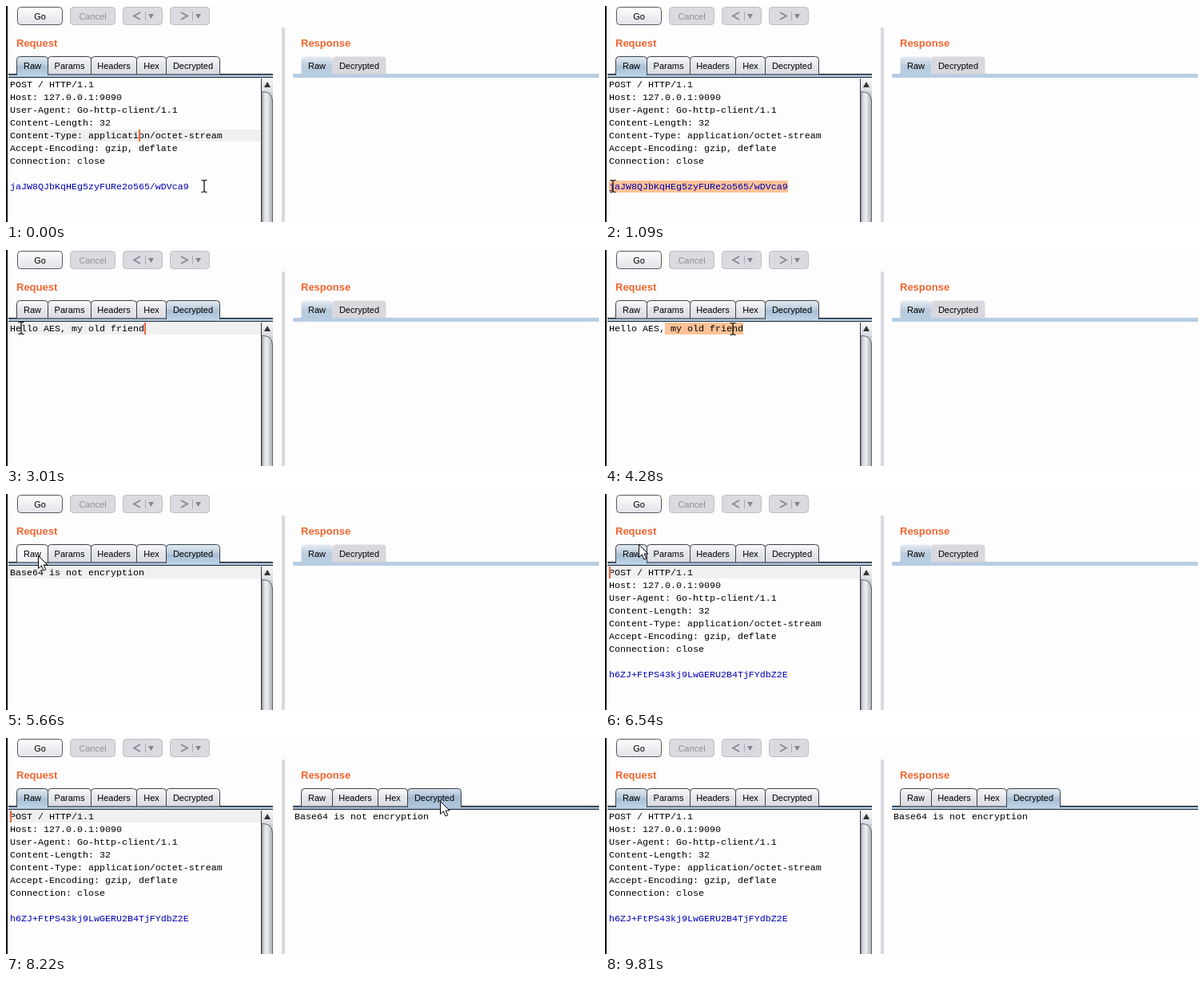
An HTML page for the animation above (9860 ms loop, 742x271 px).

```html
<!DOCTYPE html>
<html lang="en">
<head>
<meta charset="utf-8">
<title>Encrypted request editor</title>
<style>
  html, body { margin: 0; width: 100%; height: 100%; overflow: hidden; background: #fdfdfd; }
  svg { display: block; }
  text { font: 11px "Liberation Sans", Arial, sans-serif; white-space: pre; }
  .mid { text-anchor: middle; }
  .title { font-size: 13px; font-weight: bold; fill: #f0652f; }
  .code { font: 11.667px "Liberation Mono", "Courier New", monospace; }
</style>
</head>
<body>
<svg width="742" height="271" viewBox="0 0 742 271">
  <defs>
    <linearGradient id="plain" x2="0" y2="1"><stop stop-color="#fafafb"/><stop offset=".5" stop-color="#e4e6ea"/><stop offset="1" stop-color="#d9dce2"/></linearGradient>
    <linearGradient id="button" x2="0" y2="1"><stop stop-color="#fff"/><stop offset=".5" stop-color="#eeeff2"/><stop offset="1" stop-color="#e2e4e9"/></linearGradient>
    <linearGradient id="hover" x2="0" y2="1"><stop stop-color="#fff"/><stop offset="1" stop-color="#eff1f5"/></linearGradient>
    <linearGradient id="chosen" x2="0" y2="1"><stop stop-color="#e3ebf2"/><stop offset=".45" stop-color="#bccddd"/><stop offset=".55" stop-color="#a9bfd3"/><stop offset="1" stop-color="#bcd2e6"/></linearGradient>
    <linearGradient id="pressed" x2="0" y2="1"><stop stop-color="#d9e3ec"/><stop offset=".5" stop-color="#a4bad0"/><stop offset="1" stop-color="#b0c8de"/></linearGradient>
    <linearGradient id="idle" x2="0" y2="1"><stop stop-color="#e6ecf2"/><stop offset=".5" stop-color="#b9cbdc"/><stop offset="1" stop-color="#b8cde2"/></linearGradient>
    <linearGradient id="thumb"><stop stop-color="#8b8e95"/><stop offset=".2" stop-color="#d5d7dc"/><stop offset=".5" stop-color="#eceef1"/><stop offset="1" stop-color="#a6a9b1"/></linearGradient>
  </defs>
  <rect width="742" height="271" fill="#fdfdfd"/>
  <rect width="2" height="271"/>
  <rect x="345" y="27" width="4" height="244" fill="#d8d8df"/>
  <text class="title" x="13" y="51">Request</text>
  <text class="title" x="369" y="51">Response</text>
  <g id="buttons"></g>
  <g id="request"></g>
  <g id="response"></g>
  <g id="scrollbar">
    <rect x="319" y="91" width="15" height="180" fill="#c9ccd3"/>
    <rect x="320" y="91" width="14" height="17" fill="url(#plain)"/>
    <path d="M323 102L327 95L331 102Z" fill="#333"/>
    <path d="M320 271V108Q332 107 333.5 118V271Z" fill="url(#thumb)"/>
    <path d="M320 107.5Q332 107 333.5 118V271" fill="none" stroke="#63666d"/>
    <path d="M319.5 91V271" stroke="#33363b"/>
  </g>
  <g id="pointer">
    <path id="arrow" d="M.5 .5V16.5L4.3 13L7 19L9.8 17.8L7.2 12H12Z" fill="#fff" stroke="#000"/>
    <path id="beam" d="M-3.5 -7.5H-1.5L0 -6.5L1.5 -7.5H3.5M0 -6.5V6.5M-3.5 7.5H-1.5L0 6.5L1.5 7.5H3.5" fill="none" stroke="#000" stroke-width="1.2"/>
  </g>
</svg>
<script>
const LOOP = 9860, CHAR = 7, LINE = 16, LEFT = 5, RIGHT = 361;
const $ = id => document.getElementById(id);

const OLD_BODY = 'jaJW8QJbKqHEg5zyFURe2o565/wDVca9';
const NEW_BODY = 'h6ZJ+FtPS43kj9LwGERU2B4TjFYdbZ2E';
const GREETING = 'Hello AES, my old friend';
const TYPED = 'Base64 is not encryption';
const REQUEST = ['POST / HTTP/1.1', 'Host: 127.0.0.1:9090', 'User-Agent: Go-http-client/1.1',
  'Content-Length: 32', 'Content-Type: application/octet-stream',
  'Accept-Encoding: gzip, deflate', 'Connection: close', ''];
const RESPONSE = ['HTTP/1.1 200 OK', 'Date: Mon, 10 Sep 2018 12:04:31 GMT', 'Content-Length: 32',
  'Content-Type: text/plain; charset=utf-8', 'Connection: close', '', NEW_BODY];

const WIDTHS = { Raw: 39, Params: 54, Headers: 57, Hex: 37, Decrypted: 67 };
const REQUEST_TABS = ['Raw', 'Params', 'Headers', 'Hex', 'Decrypted'];
const RESPONSE_TABS = ['Raw', 'Headers', 'Hex', 'Decrypted'];

// time, x, y; the pointer is a text beam below the tab bars
const PATH = [
  [0, 248, 226], [320, 248, 226], [480, 261, 226], [620, 232, 226], [1080, 10, 226],
  [1320, 10, 226], [1690, 205, 82], [1780, 228, 55], [1890, 225, 69], [2350, 225, 69],
  [2540, 60, 104], [2700, 19, 98], [3450, 19, 98], [3570, 203, 95], [3680, 168, 95],
  [3860, 168, 95], [4100, 160, 99], [4640, 160, 99], [5100, 150, 103], [5590, 140, 96],
  [5650, 40, 77], [6420, 40, 77], [6800, 48, 17], [7430, 48, 17], [7980, 543, 79],
  [8610, 543, 79], [8790, 560, 121], [9220, 560, 121], [9800, 692, 292]
];
// time, first selected column of the greeting
const WORD_STEPS = [[3860, 24], [3910, 18], [4030, 14], [4150, 11], [4250, 10], [4340, 6], [4390, 0]];

function pointerAt(t) {
  const i = PATH.findIndex(p => p[0] > t);
  if (i < 0) return PATH[PATH.length - 1].slice(1);
  const [t0, x0, y0] = PATH[i - 1], [t1, x1, y1] = PATH[i];
  const u = (t - t0) / (t1 - t0), k = u * u * (3 - 2 * u);
  return [x0 + (x1 - x0) * k, y0 + (y1 - y0) * k];
}

const rect = (x, y, w, h, fill, extra = '') =>
  `<rect x="${x}" y="${y}" width="${w}" height="${h}" fill="${fill}" ${extra}/>`;
const lineTop = row => 91 + LINE * row;
const code = (x, row, str, fill = '#000') =>
  `<text class="code" x="${x}" y="${lineTop(row) + 11}" fill="${fill}">${str}</text>`;
const band = row => rect(3, lineTop(row), 316, 15, '#f0f0f0');
const caret = (col, row) => rect(LEFT + CHAR * col, lineTop(row), 2, 15, '#f0653a');
const selection = (from, to, row) =>
  rect(LEFT + CHAR * from, lineTop(row), CHAR * (to - from), 15, '#ffc296');

function button(x, w, on, label) {
  const face = rect(x + .5, 1.5, w, 22, on ? 'url(#button)' : '#d9dbe0',
    `rx="4" stroke="${on ? '#55585f' : '#bcbec5'}"`);
  return face + (label ? `<text class="mid" x="${x + w / 2 + .5}" y="17" fill="${on ? '#000' : '#8e9096'}">${label}</text>` : '');
}

function arrowButton(x, chevron) {
  return button(x, 49, false) +
    `<path d="${chevron}" fill="none" stroke="#85878d" stroke-width="1.7"/>` +
    `<path d="M${x + 28.5} 7V18" stroke="#a9abb1"/>` +
    `<path d="M${x + 32} 10H${x + 39}L${x + 35.5} 16Z" fill="#85878d"/>`;
}

function tabs(x, end, names, chosen, { idle, pressed, hover } = {}) {
  const start = x - 10;
  let out = idle
    ? rect(start, 85, end - start, 5, '#b8cde2')
    : rect(start, 85, end - start, 5, '#16202b') +
      rect(start, 86.5, end - start, 2.5, pressed ? '#a3bdd5' : '#b8d0e6');
  for (const name of names) {
    const w = WIDTHS[name], on = name === chosen;
    const fill = idle ? (on ? 'url(#idle)' : '#d8d8de')
      : on ? `url(#${pressed ? 'pressed' : 'chosen'})`
      : `url(#${name === hover ? 'hover' : 'plain'})`;
    const base = on ? 87 : 85.5;
    out += `<path d="M${x + .5} ${base}V67.5Q${x + .5} 63.5 ${x + 4.5} 63.5H${x + w - 3.5}` +
      `Q${x + w + .5} 63.5 ${x + w + .5} 67.5V${base}" fill="${fill}" stroke="${idle ? 'none' : '#3b4048'}"/>` +
      `<text class="mid" x="${x + w / 2 + .5}" y="79">${name}</text>`;
    x += w;
  }
  return out;
}

function rawRequest(body, under, over = '') {
  return under + REQUEST.map((s, i) => code(LEFT, i, s)).join('') + code(LEFT, 8, body, '#0000b4') + over;
}

function requestText(t, x) {
  if (t < 1890) {
    if (t < 620) return rawRequest(OLD_BODY, band(4), caret(23, 4));
    const from = t > 1080 ? 0 : Math.max(0, Math.min(32, Math.round((x - LEFT) / CHAR)));
    return rawRequest(OLD_BODY, selection(from, 32, 8));
  }
  if (t < 2650) return code(LEFT, 0, GREETING);
  if (t < 3860) return band(0) + code(LEFT, 0, GREETING) + caret(t < 3010 ? 1 : 24, 0);
  if (t < 4640) {
    const from = WORD_STEPS.filter(s => s[0] <= t).pop()[1];
    return selection(from, 24, 0) + code(LEFT, 0, GREETING);
  }
  if (t < 5780) {
    const n = Math.min(24, 1 + Math.floor((t - 4640) / 950 * 23));
    return band(0) + code(LEFT, 0, TYPED.slice(0, n)) + (t < 5620 ? caret(n, 0) : '');
  }
  const focus = t < 8660;
  const lit = t < 6160 || Math.floor((t - 6160) / 500) % 2 === 0;
  return rawRequest(NEW_BODY, focus ? band(0) : '', focus && lit ? caret(0, 0) : '');
}

function requestPane(t, x) {
  const decrypted = t >= 1890 && t < 5780;
  return tabs(13, 334, REQUEST_TABS, decrypted ? 'Decrypted' : 'Raw', {
    pressed: t >= 1890 && t < 2170 || t >= 5780 && t < 6060,
    hover: t >= 5640 && t < 5780 ? 'Raw' : ''
  }) + requestText(t, x);
}

function responsePane(t) {
  if (t < 7330) return tabs(369, 742, ['Raw', 'Decrypted'], 'Raw', { idle: true });
  if (t < 8170) return tabs(369, 742, RESPONSE_TABS, 'Raw') + RESPONSE.map((s, i) => code(RIGHT, i, s)).join('');
  return tabs(369, 742, RESPONSE_TABS, 'Decrypted', { pressed: t < 8360 }) + code(RIGHT, 0, TYPED);
}

function toolbar(t) {
  const busy = t >= 7100 && t < 7330;
  return button(14, 56, !busy, 'Go') + button(80, 56, busy, 'Cancel') +
    arrowButton(146, 'M168 8L160 12.5L168 17') + arrowButton(205, 'M219 8L227 12.5L219 17');
}

const shown = {};
function put(id, markup) {
  if (shown[id] === markup) return;
  shown[id] = markup;
  $(id).innerHTML = markup;
}

function draw(t) {
  const [x, y] = pointerAt(t), inText = y >= 91;
  put('buttons', toolbar(t));
  put('request', requestPane(t, x));
  put('response', responsePane(t));
  $('pointer').setAttribute('transform', `translate(${Math.round(x)} ${Math.round(y)})`);
  $('beam').style.display = inText ? '' : 'none';
  $('arrow').style.display = inText ? 'none' : '';
}

const begin = performance.now();
function tick() {
  draw((performance.now() - begin) % LOOP);
  requestAnimationFrame(tick);
}
tick();
</script>
</body>
</html>
```
